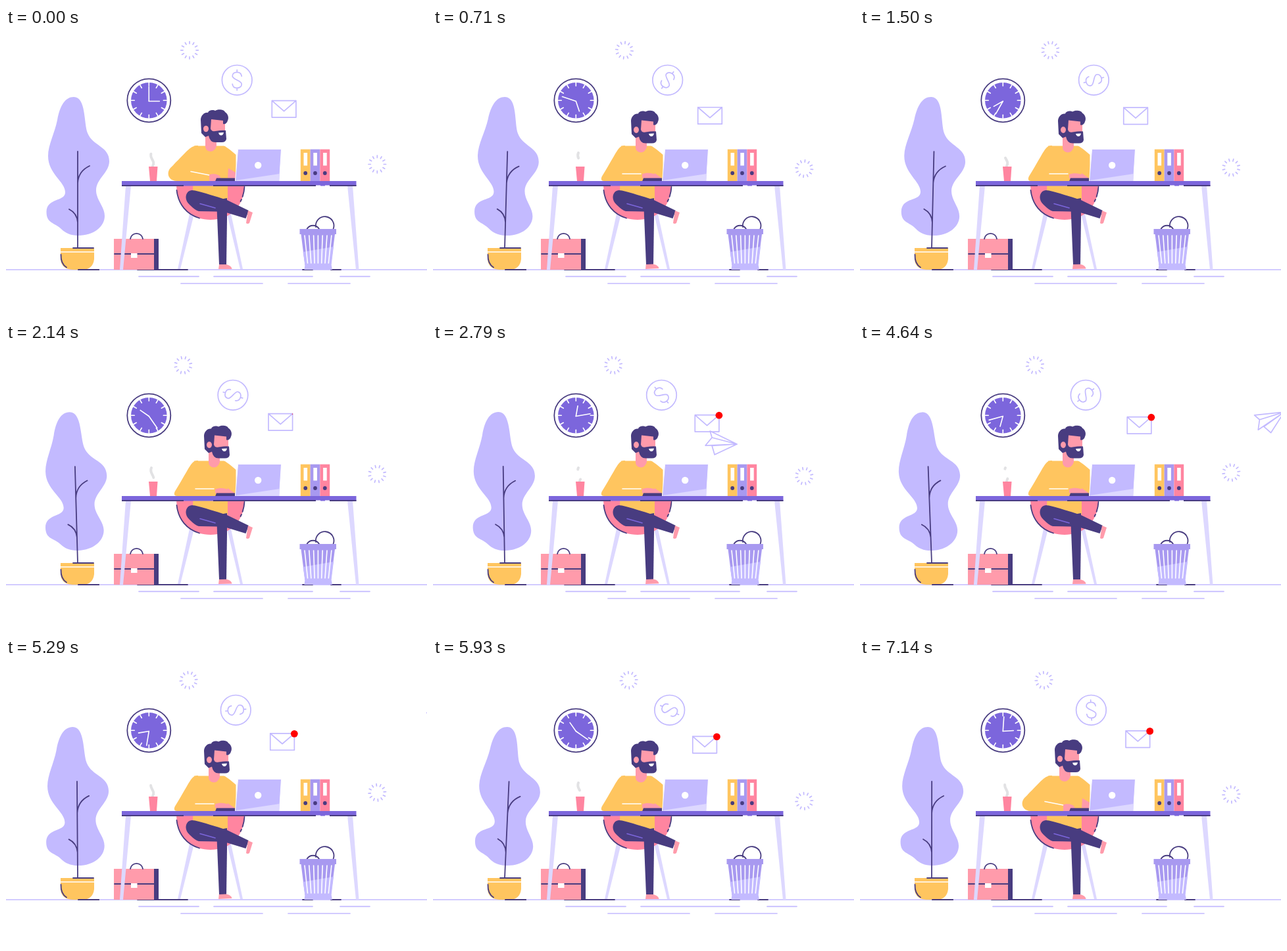
These frames come from a looping animation (640 by 437 pixels, 7.21 s). An HTML page:

```html
<!DOCTYPE html>
<html lang="en">
<head>
<meta charset="utf-8">
<title>Office desk</title>
<style>
  html, body { margin: 0; width: 100%; height: 100%; overflow: hidden; background: #fff; }
  svg { display: block; width: 100%; height: 100%; }
  .line { fill: none; stroke: #c3baff; stroke-width: 1.7; stroke-linejoin: round; stroke-linecap: round; }
  .ink { fill: none; stroke: #483c80; stroke-width: 1.8; stroke-linecap: round; }
  .white { fill: none; stroke: #fff; stroke-width: 1.6; stroke-linecap: round; }
  .dark { fill: #483c80; }
  .violet { fill: #7c66dc; }
  .mid { fill: #a899f0; }
  .lilac { fill: #c3baff; }
  .pale { fill: #ddd8ff; }
  .yellow { fill: #ffc55f; }
  .pink { fill: #ff85a0; }
  .skin { fill: #ff9bab; }
  .paper { fill: #fff; }
</style>
</head>
<body>
<svg viewBox="0 0 640 437">
  <!-- floor -->
  <path class="line" d="M0 368H640M202 378.300H293M316 378.300H466M508 378.300H553M266 389H390M429 389H523"/>
  <path class="ink" d="M110 368H141M200 368H276M451 368H466M494 368H509"/>

  <!-- plant -->
  <g id="plant">
    <path class="lilac" d="M103 105C90 105 82 118 78 140C74 160 64 178 64 195C64 222 90 234 90 250C90 265 62 258 61.500 280C61.500 298 74 296 84 306C90 312 98 316 110 316C134 316 150 302 150 286C150 272 137 262 137 247C137 230 157 220 157 203C157 180 132 180 124 160C118 145 122 105 103 105Z"/>
    <path class="ink" d="M109 188V335M127 210Q110 218 109 236M96 276Q108 282 109 296"/>
  </g>
  <path class="yellow" d="M83 335H134V352Q132 368 116 368H101Q84 367 83 352Z"/>
  <path class="white" d="M82 341H135"/>
  <path class="ink" d="M102 335H133M83.500 345Q83 359 92 364.500M110 368H141"/>

  <!-- briefcase -->
  <path class="skin" d="M164 321H225V368H164Z"/>
  <path class="dark" d="M225 321H232V368H225Z"/>
  <path class="ink" d="M189 321A9.600 9.600 0 0 1 208 321M165 344H226"/>
  <path class="paper" d="M190 343H199.500V350H190Z"/>

  <!-- clock -->
  <circle cx="217.300" cy="110.300" r="33" class="ink"/>
  <circle cx="217.300" cy="110.300" r="27.300" class="violet"/>
  <g id="ticks" class="white" transform="translate(217.300 110.300)"></g>
  <path id="hour" class="white" d="M0 0V-16"/>
  <path id="minute" class="white" d="M0 0V-22"/>

  <!-- floating icons -->
  <g id="spinA" class="line"></g>
  <g id="spinB" class="line"></g>
  <g id="coin" class="line">
    <circle r="22.800"/>
    <path id="dollar" d="M7 -6C6.500 -10 4 -12 0 -12C-4.500 -12 -7 -9.500 -7 -6C-7 -1 7 1 7 6C7 9.500 4.500 12 0 12C-4 12 -6.500 10 -7 6M0 -15.500V-12M0 12V15.500"/>
  </g>
  <g id="mail">
    <path class="line" d="M-18.300 -12.700H18.300V12.700H-18.300ZL0 3.200L18.300 -12.700"/>
    <circle id="dot" cx="18.300" cy="-12.200" r="5.400" fill="#f00"/>
  </g>
  <path id="plane" class="line" d="M24 1L-17 -19L-14 -9L-24 3L24 1L-10 17L-14 3.500L24 1L-14 -9"/>

  <!-- chair -->
  <path class="pale" d="M279 283H286L265 367H261ZM336 283H342L360 367H356Z"/>
  <path class="pink" d="M259 239H362.500C362 273 340 292 311 292C281 292 260 273 259 239Z"/>
  <path class="ink" d="M259.500 247C262 269 275 284 294 289.500M362.500 242Q362 250 359.500 257M358 261L356.500 264"/>

  <!-- man -->
  <path class="yellow" d="M286 179.500H331Q334 179.500 349.500 193V234H337V261H300L284 250Z"/>
  <path class="dark" d="M320 262L336 259V290L335 360H324Z"/>
  <path class="dark" d="M283 247Q290 247 336 262L369 278L364.500 290L335 281Q326 279 293 279Q288 278 279 269C269 260 274 247 283 247Z"/>
  <path class="skin" d="M368 278L375 281L370 297Q367 299 365 297L366 290Z"/>
  <path stroke="#7c66dc" stroke-width="1.600" stroke-linecap="round" d="M295 267.500L318 274"/>
  <path id="foot" class="skin" d="M323 367L324 360H335Q343 362 343.500 367Z"/>
  <g id="head">
    <path class="skin" d="M303 162H320V180Q317 188 311 188Q303 187 303 180ZM309 136H333V160H309Z"/>
    <path class="dark" d="M297 160L296 140C296 133 302 128 307 129C308 125 315 124 318 126C322 123 332 124 333 128C338 131 339 137 337 141C336 145 333 147 330 146L330 141L312 139L311 153Q312 158 318 157Q330 155 334 156L335 169Q334 174 328 174H318Q310 174 308 164L303 166Z"/>
    <ellipse class="skin" cx="304" cy="153.500" rx="4" ry="4.800"/>
    <path class="paper" d="M323 159.500L331 159Q330 163.500 327 163.500Q324 163.500 323 159.500Z"/>
  </g>
  <path id="far" class="skin"/>
  <path id="arm" class="yellow"/>
  <path id="cuff" class="white"/>
  <path id="hand" class="skin"/>

  <!-- desk -->
  <path class="dark" d="M320 228.500H348V233.500H318Z"/>
  <path class="lilac" stroke="#fff" d="M352.500 184.500H418.500L415.500 233.500H348.500Z"/>
  <path class="pale" d="M349.500 232L416 222L415.500 233H349.500Z"/>
  <circle class="paper" cx="383.200" cy="209" r="5.200"/>
  <path id="steam" fill="none" stroke="#e2e2e4" stroke-width="4" stroke-linecap="round" pathLength="24" stroke-dasharray="24 18" d="M223 210C228 202 217 199 221 190"/>
  <path class="pink" d="M217 211H230.500L229 233H219Z"/>
  <g id="binders"></g>
  <path class="pale" d="M182 240H190L178 368H173ZM519 240H527L536.500 368H532Z"/>
  <path class="violet" d="M176 233H532.500V240.500H176Z"/>
  <path class="dark" d="M176 239H270V241H176ZM315 239H471V241H315ZM492 239H532.500V241H492Z"/>
  <path class="paper" d="M471 239.500H478V241H471ZM485 239.500H492V241H485Z"/>

  <!-- bin -->
  <path class="ink" d="M457.500 306A10.500 10 0 0 1 476 306M471 303A13.800 13.800 0 1 1 497.500 306"/>
  <path class="mid" d="M446.500 306H502V314H446.500ZM448.500 314H500L494 361H454.500Z"/>
  <path class="lilac" d="M451.500 341L498 333L494.500 361H454.500ZM454.500 360H494.500L496 368H453.500Z"/>
  <path id="slits" class="white"/>
</svg>
<script>
const LOOP = 7210, LEG = 1195;
const $ = id => document.getElementById(id);
const set = (id, name, value) => $(id).setAttribute(name, value);
const move = (id, x, y, extra = '') => set(id, 'transform', `translate(${x} ${y})${extra}`);
const clamp = v => Math.min(1, Math.max(0, v));
const smooth = v => { v = clamp(v); return v * v * (3 - 2 * v); };
const mix = (a, b, k) => a + (b - a) * k;

// straight legs of equal length between the given values
function legs(t, values) {
  const p = Math.min(t / LEG, values.length - 1.0001);
  const i = Math.floor(p);
  return mix(values[i], values[i + 1], p - i);
}
const sway = (t, hi, lo) => legs(t, [0, hi, lo, hi, lo, hi, 0]);

// smooth curve through [time, value] points
function curve(t, pts) {
  const last = pts.length - 2;
  let i = 0;
  while (i < last && t > pts[i + 1][0]) i++;
  const slope = j => {
    const a = pts[Math.max(j - 1, 0)], b = pts[Math.min(j + 1, last + 1)];
    return (b[1] - a[1]) / (b[0] - a[0]);
  };
  const [t0, a] = pts[i], [t1, b] = pts[i + 1];
  const d = t1 - t0, u = clamp((t - t0) / d), w = 1 - u;
  return a * w * w * (1 + 2 * u) + b * u * u * (3 - 2 * u)
    + d * u * w * (w * slope(i) - u * slope(i + 1));
}

// blend two paths of the same structure
function morph(from, to, k) {
  const ends = to.match(/-?[\d.]+/g);
  let i = 0;
  return from.replace(/-?[\d.]+/g, n => mix(+n, +ends[i++], k).toFixed(2));
}

const dashes = (from, to) => Array.from({ length: 12 }, (_, i) =>
  `<path d="M0 ${-from}V${-to}" transform="rotate(${i * 30})"/>`).join('');
$('ticks').innerHTML = dashes(22, 27);
$('spinA').innerHTML = $('spinB').innerHTML = dashes(10, 13.3);

$('binders').innerHTML = ['yellow', 'mid', 'pink'].map((c, i) => {
  const x = 447.8 + i * 14.8;
  return `<path class="${c}" d="M${x} 184.700h14.800v48.500h-14.800z"/>
    <path class="paper" d="M${x + 4.7} 190h5.600v19.500h-5.600z"/>
    <circle class="dark" cx="${x + 7.4}" cy="221" r="2.900"/>`;
}).join('');

set('slits', 'd', Array.from({ length: 7 }, (_, i) =>
  `M${454 + i * 6.8} 316L${458.5 + i * 5.3} 358`).join(''));

const poses = {
  arm: ['M292 179C280 179 276 187 250 213C243 221 247 233 260 233L309 233L311 222L292 216Z',
        'M292 179C281 179 281 187 258 224C254 230 256 233 260 233L318 233L320 222L292 220Z'],
  cuff: ['M281 218.500L309 224', 'M288 222L316 222'],
  hand: ['M309 223.500C314 221 324 222 326 227L327 230L326 233L309 233Z',
         'M318 223C324 220 335 221 340 225L346 229L340 230L318 229Z'],
  far: ['M338 213.500L349 220L349 230L337 228Z', 'M337 221L347 228L347 230L333 230Z']
};
const path = {
  x: [[2350, 414], [2790, 438], [3860, 575], [4640, 624], [5450, 674]],
  y: [[2350, 124], [2790, 153], [3860, 150], [4640, 117], [5450, 84]],
  turn: [[2350, 0], [2790, 0], [3860, -32], [4640, -32], [5450, -32]]
};

function draw(t) {
  const spin = ` rotate(${t * .05})`, hands = t * .1003;
  set('plant', 'transform', `rotate(${sway(t, 2.75, -2.75)} 109 335)`);
  move('hour', 217.3, 111.5, ` rotate(${90 + hands})`);
  move('minute', 217.3, 111.5, ` rotate(${-hands})`);
  move('spinA', 279 + sway(t, 20, -17.4), 33.8, spin);
  move('spinB', 564.3, 207.5 + sway(t, 11.2, -13), spin);
  move('coin', 351.2 + sway(t, 9.2, -10.3), 79.3);
  set('dollar', 'transform', spin);

  move('mail', 422.6 + legs(t, [0, -2.7, -6, -6.1, 3, -10, 0]),
    123.4 + legs(t, [0, 16.9, -8.3, 13.5, .5, 9, 0]));
  const pop = smooth((t - 2100) / 200);
  move('dot', 18.3 * (1 - pop), -12.2 * (1 - pop), ` scale(${pop})`);

  set('plane', 'visibility', t > 2350 && t < 5450 ? 'visible' : 'hidden');
  move('plane', curve(t, path.x), curve(t, path.y),
    ` rotate(${curve(t, path.turn)}) scale(${smooth((t - 2350) / 350)})`);

  set('steam', 'stroke-dashoffset', 2 - t * 168 / LOOP);
  const lean = smooth(t / 600) * smooth((7130 - t) / 600);
  move('head', 5 * lean, 1.6 * lean);
  for (const id in poses) set(id, 'd', morph(...poses[id], lean));
  move('hand', 0, -.5 * lean * Math.abs(Math.sin(t * Math.PI / 300)));
  set('foot', 'transform', `rotate(${-1.5 + 1.5 * Math.cos(t * Math.PI * 12 / LOOP)} 324 366)`);
}

function tick(now) {
  draw(now % LOOP);
  requestAnimationFrame(tick);
}
draw(0);
requestAnimationFrame(tick);
</script>
</body>
</html>
```
